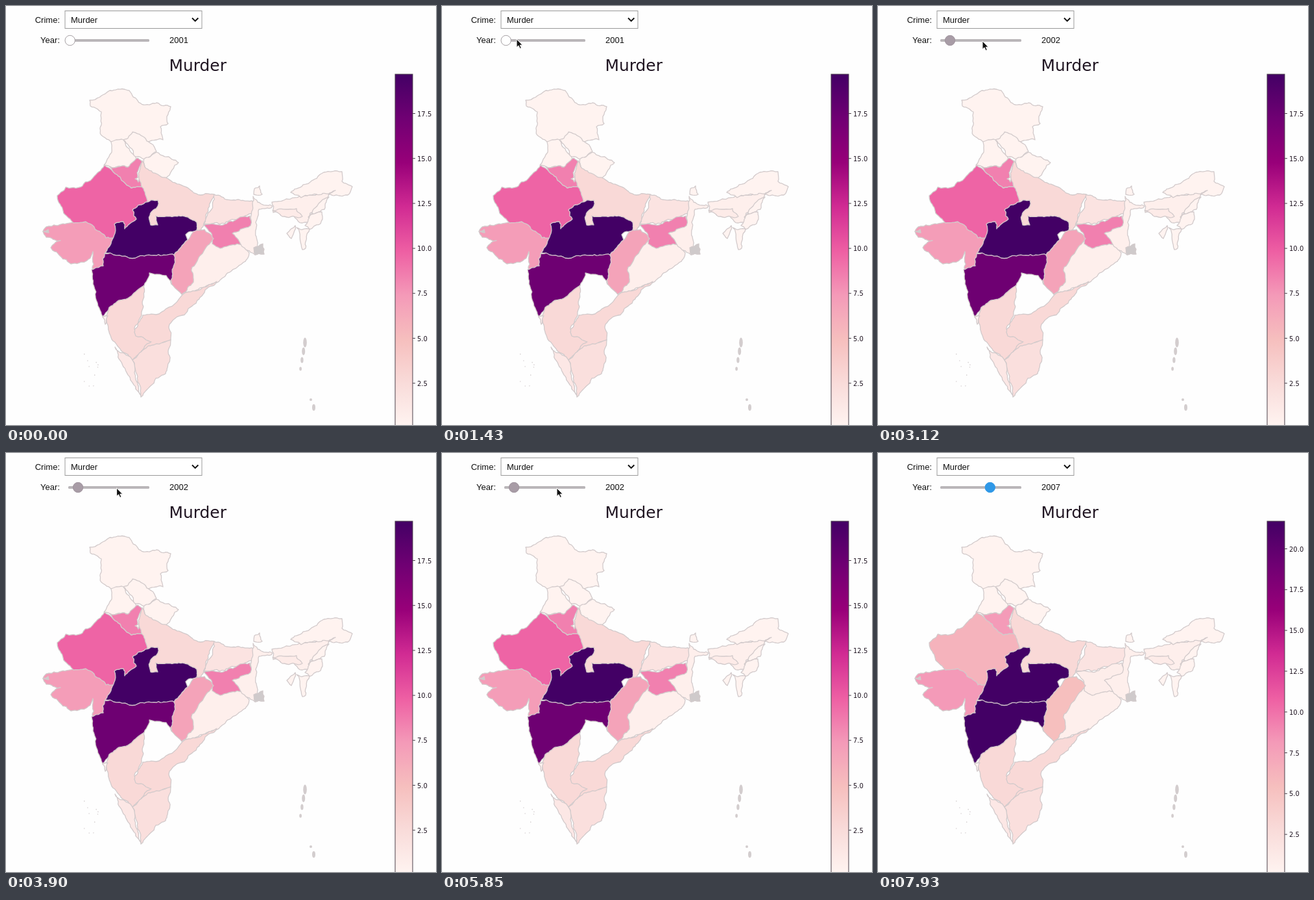
Recreate the animation shown at these times as an HTML page. Size 663x645 px, loop 8 s.

```html
<!DOCTYPE html>
<html lang="en">
<head>
<meta charset="utf-8">
<style>
html, body { margin: 0; width: 100%; height: 100%; overflow: hidden; background: #fefefe; }
svg { display: block; }
.ui { font: 13px "Liberation Sans", Arial, sans-serif; fill: #111; }
.plot { font-family: "DejaVu Sans", sans-serif; fill: #201522; }
#map path { stroke: #d2cacb; stroke-width: 1.3; stroke-linejoin: round; }
</style>
</head>
<body>
<svg width="663" height="645" viewBox="0 0 663 645">
  <defs><linearGradient id="ramp" gradientUnits="userSpaceOnUse" x1="0" y1="650" x2="0" y2="105"></linearGradient></defs>
  <g class="ui">
    <text x="83" y="26" text-anchor="end">Crime:</text>
    <rect x="91" y="7.5" width="211" height="27" fill="#fff" stroke="#999"/>
    <text x="100" y="26">Murder</text>
    <path d="M287 18.5l4.7 4.7 4.7-4.7" fill="none" stroke="#111" stroke-width="2"/>
    <text x="83" y="57" text-anchor="end">Year:</text>
    <rect x="96" y="51" width="125" height="4" rx="1.5" fill="#bab6b9"/>
    <circle id="knob" cy="53" r="7.7"/>
    <text id="year" x="252" y="57"></text>
  </g>
  <text class="plot" x="251.5" y="100" font-size="24.9">Murder</text>
  <g id="map"></g>
  <g id="islands" fill="#d3cdce"></g>
  <rect x="600" y="105" width="27" height="560" fill="url(#ramp)" stroke="#4a404a"/>
  <g id="ticks" class="plot" font-size="10"></g>
  <path id="cursor" d="M0 0V12.6L3 9.9 5.2 14.6 7.4 13.6 5.3 9.2H9.2Z" fill="#111" stroke="#fff"/>
</svg>
<script>
const $ = id => document.getElementById(id);
const LOOP = 8000, STEP = 130, DRAG = 2470, SWITCH = 7930;
const mix = (a, b, k) => a + (b - a) * k;
const noise = n => { const v = Math.sin(n) * 43758.5; return v - Math.floor(v); };

function add(parent, tag, attrs, text = '') {
  const el = document.createElementNS('http://www.w3.org/2000/svg', tag);
  for (const key in attrs) el.setAttribute(key, attrs[key]);
  el.textContent = text;
  return parent.appendChild(el);
}

// Fractal border: symmetric in its ends, so neighbours share the same line.
function border([x, y], [u, v]) {
  const length = Math.hypot(u - x, v - y);
  if (length < 5) return `L${u.toFixed(1)} ${v.toFixed(1)}`;
  const size = Math.min(4, length * .3), sx = x + u, sy = y + v;
  const mid = [sx / 2 + (noise(sx + sy * 3.7) - .5) * size, sy / 2 + (noise(sx * 2.3 + sy) - .5) * size];
  return border([x, y], mid) + border(mid, [u, v]);
}

function outline(points) {
  const p = points.split(' ').map(s => s.split(',').map(Number));
  return `M${p[0]}` + p.map((a, i) => border(a, p[(i + 1) % p.length])).join('') + 'Z';
}

const palette = ['#fff5f2', '#f9dcda', '#f6bfbe', '#f49ab8', '#ee5fa3', '#d12b93', '#980079', '#700073', '#430065'];

// Palette colour for a level from 0 to 1
function shade(level) {
  const pos = Math.min(level, .9999) * (palette.length - 1), i = Math.floor(pos);
  const channel = (hex, c) => parseInt(hex.substr(1 + c * 2, 2), 16);
  return `rgb(${[0, 1, 2].map(c => Math.round(mix(channel(palette[i], c), channel(palette[i + 1], c), pos - i)))})`;
}

// Key points, level and later level. Later regions cover the inner edges of earlier ones.
const regions = [
  ['129,145 149,137 160,130 190,130 212,152 232,149 254,155 248,175 250,181 238,186 242,206 180,210 162,209 147,199 147,163 130,154', .01],
  ['162,209 181,206 201,236 188,248 151,245 160,229', .01],
  ['181,206 195,194 213,202 232,224 213,236 198,231', .01],
  ['213,235 232,225 266,241 247,265 228,262 213,249', .01],
  ['210,238 216,250 250,266 300,291 321,290 308,325 300,345 215,345 200,300 207,250', .14],
  ['321,290 340,298 383,302 384,318 345,330 330,336 305,335 317,313', .09],
  ['381,293 388,302 411,308 390,313 385,333 392,380 384,383 340,352 378,330', .03],
  ['382,372 396,366 398,382 384,383', 'gray'],
  ['383,281 391,277 395,290 382,290', .01],
  ['320,362 362,367 375,380 362,398 325,426 277,441 270,420 290,370', .03],
  ['305,337 335,337 376,323 377,338 349,350 362,367 330,373 318,366 316,349', .43, .04],
  ['57,347 66,339 123,332 168,350 165,381 150,400 133,404 134,378 127,390 100,397 69,372 84,361 62,356', .365, .375],
  ['57,347 65,344 66,349', 'gray'],
  ['152,245 165,255 193,280 209,278 218,300 200,330 180,355 154,357 123,332 104,334 88,315 79,292 92,279 118,277 139,259', .49, .29],
  ['160,247 188,248 203,234 210,240 203,264 209,278 193,280 165,255', .43, .37],
  ['199,266 205,263 204,271', 0],
  ['325,424 277,441 264,455 236,474 211,476 190,515 220,530 254,514 252,490 289,460', .14],
  ['213,430 203,437 159,464 152,480 163,513 195,545 224,517 200,508 198,497 209,476', .14],
  ['168,525 195,545 208,600 190,570', .07],
  ['195,545 220,523 254,514 246,566 231,573 208,602 207,585', .11],
  ['149,479 157,477 153,490', .01],
  ['290,345 306,344 320,358 303,381 287,402 289,425 271,444 255,428 259,383 280,360', .345, .25],
  ['132,406 150,400 152,381 180,370 255,370 260,390 255,428 247,415 221,411 213,430 203,437 159,464 149,478 138,447', .88, 1],
  ['195,314 215,302 234,299 234,308 222,322 223,337 234,337 231,323 272,323 294,333 294,345 277,352 280,360 259,383 190,388 153,380 168,350 167,336 181,332 183,343 201,328', 1],
  ['410,302 432,297 505,284 466,325 470,335 457,334 436,316 412,318', .03],
  ['439,287 490,256 518,255 518,270 534,278 527,291 497,290 508,284 455,295', .01],
  ['411,315 448,312 457,324 433,325', .05],
  ['498,294 491,313 470,321 482,304', .01],
  ['470,321 487,317 485,335 468,344 461,338', .01],
  ['448,341 468,343 462,373 457,375', .01],
  ['433,350 446,338 440,358', .01]
].map(([points, level, later = level]) => {
  const [before, after] = [level, later].map(v => v === 'gray' ? '#cfcacb' : shade(v));
  return { el: add($('map'), 'path', { d: outline(points) }), before, after };
});

const islet = (cx, cy, rx, ry) => add($('islands'), 'ellipse', { cx, cy, rx, ry });
for (let i = 0; i < 4; i++) islet(461 - i * 2.3, 518 + i * 13.5, 2.8 - i * .3, 7.5 - i * 1.5);
islet(470, 606, 2, 2);
islet(474.5, 618, 2.5, 5);
for (let i = 0; i < 10; i++) islet(115 + noise(i + 3) * 29, 534 + noise(i + 40) * 56, .8, .8);

palette.forEach((color, i) => add($('ramp'), 'stop', { offset: i / (palette.length - 1), 'stop-color': color }));

function scale(top, firstY, step) {
  const group = add($('ticks'), 'g', {});
  for (let value = top, y = firstY; value > 0; value -= 2.5, y += step) {
    add(group, 'path', { d: `M627 ${y}h4`, stroke: '#4a404a' });
    add(group, 'text', { x: 634, y: y + 4 }, value.toFixed(1));
  }
  return group;
}
const scaleBefore = scale(17.5, 165.5, 69.2);
const scaleAfter = scale(20, 147.5, 62.8);

const knobStyle = {
  2001: { fill: '#fff', stroke: '#a5a0a3' },
  2002: { fill: '#a89ca6', stroke: '#a0949e' },
  2007: { fill: '#2f98e7', stroke: '#2f98e7' }
};

// Pointer stops: time, x, y
const pointer = [[1170, 142, 38], [1430, 115, 51], [2080, 106, 51], [3120, 161, 54], [4420, 177, 54], [7410, 177, 54]];

function pointerAt(t) {
  const i = pointer.findIndex(stop => stop[0] > t);
  if (i < 1) return null;
  const [from, to] = [pointer[i - 1], pointer[i]];
  const k = (t - from[0]) / (to[0] - from[0]);
  return [mix(from[1], to[1], k), mix(from[2], to[2], k)];
}

function draw(t) {
  const late = t >= SWITCH;
  const year = late ? 2007 : t >= DRAG ? 2002 : 2001;
  $('year').textContent = year;
  $('knob').setAttribute('cx', 98.7 + (year - 2001) * 12.35);
  Object.assign($('knob').style, knobStyle[year]);
  for (const { el, before, after } of regions) el.setAttribute('fill', late ? after : before);
  scaleBefore.style.display = late ? 'none' : '';
  scaleAfter.style.display = late ? '' : 'none';

  const at = pointerAt(Math.floor(t / STEP) * STEP);
  $('cursor').style.display = at ? '' : 'none';
  if (at) $('cursor').setAttribute('transform', `translate(${at})`);
}

const start = performance.now();
function tick() {
  draw((performance.now() - start) % LOOP);
  requestAnimationFrame(tick);
}
tick();
</script>
</body>
</html>
```
